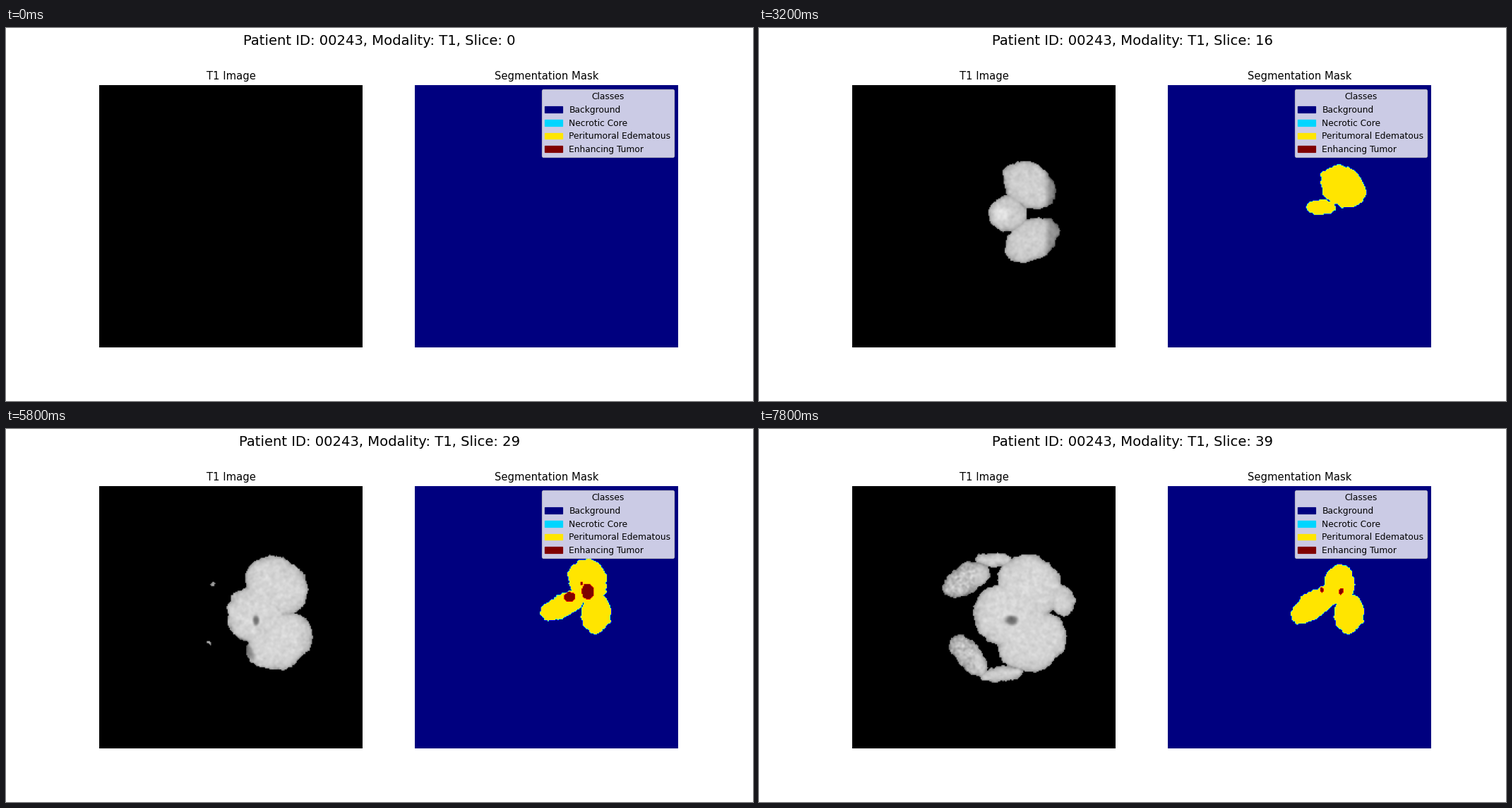
Recreate the animation shown at these times as a matplotlib script. Size 1058 by 529 pixels, loop 8 s.

```python
import numpy as np
import matplotlib.pyplot as plt
from matplotlib.animation import FuncAnimation
from matplotlib.patches import Patch

W, H = 1058, 529
SLICES, STEP_MS = 40, 200
N = 240                                  # voxels per image side
SIDE = W * 0.775 / 2.2                   # panel side in stage pixels
LEFT, TOP = W * 0.125, H * 0.505 - SIDE / 2

# voxel centres in stage pixels of the left panel
row, col = np.mgrid[:N, :N]
X = LEFT + (col + 0.5) * SIDE / N
Y = TOP + (row + 0.5) * SIDE / N


def lerp(a, b, t):
    return a + (b - a) * t


def ramp(n, start, end):
    return min(max((n - start) / (end - start), 0), 1)


def pulse(n, start, end):
    return np.sin(np.pi * ramp(n, start, end))


def settle(h, pace):
    """Shrinks evenly below zero, levels off at one above it."""
    return h / 8 if h < 0 else 1 - np.exp(-h / pace)


def axes_of(x, y, rx, ry, deg):
    c, s = np.cos(np.radians(deg)), np.sin(np.radians(deg))
    u, v = (X - x) * c + (Y - y) * s, (Y - y) * c - (X - x) * s
    return u / rx, v / ry


def blob(x, y, rx, ry, deg=0):
    """Approximate signed distance to an ellipse, positive inside."""
    if min(rx, ry) <= 0.5:
        return np.full(X.shape, -99.0)
    u, v = axes_of(x, y, rx, ry, deg)
    r = np.hypot(u, v)
    return r * (1 - r) / (np.hypot(u / rx, v / ry) + 1e-9)


def spot(x, y, rx, ry, deg=0):
    """Flat-topped soft ellipse."""
    u, v = axes_of(x, y, rx, ry, deg)
    return np.exp(-(u * u + v * v)**2)


def union(*fields):
    return np.max(fields, axis=0)


def blur(a, times):
    for _ in range(times):
        for axis in (0, 1):
            a = (np.roll(a, 1, axis) + 2 * a + np.roll(a, -1, axis)) / 4
    return a / a.std()


rng = np.random.default_rng(7)
ragged, wavy, swirl_a, swirl_b = (
    blur(rng.normal(size=X.shape), k) for k in (1, 14, 4, 4))
rough = 0.5 * ragged + 0.9 * wavy


def tissue_field(n):
    h = n - 10
    wide, thick = settle(h, 6), settle(h, 12)
    horn, arch = ramp(n, 28, 39), ramp(n, 33, 39)
    return union(
        # two lobes and the stem between them
        blob(383, 224, lerp(30, 48, wide), lerp(21, 46, thick), 36),
        blob(387, 301, lerp(28, 50, wide), lerp(18, 45, thick), -30),
        blob(351 + 0.2 * h, 264, 20 + 1.15 * h, min(18 + 1.3 * h, 48)),
        # side horns, their arches and the outer bulge
        blob(293, lerp(222, 214, horn), 36 * horn, 20 * horn, -28),
        blob(lerp(288, 297, horn), lerp(303, 322, horn),
             36 * horn, 18 * horn, 50),
        blob(332, 186, 27 * arch, 10 * arch),
        blob(345, 348, 32 * arch, 11 * arch, -8),
        blob(428, 243, 18 * arch, 24 * arch, -20))


def label_field(n):
    h = n - 10
    wide, thick = settle(h, 6), settle(h, 12)
    turn, lean, sink = ramp(n, 22, 33), ramp(n, 10, 33), ramp(n, 33, 39)
    tail = 1 + min(h, 0) / 12
    foot = ramp(n, 17, 29)
    return union(
        blob(lerp(380, 375, turn), lerp(226, 212, turn) + 10 * sink,
             lerp(27 + 13 * wide, 29, turn), lerp(17 + 25 * thick, 22, turn),
             lerp(36, 90, turn)),
        blob(lerp(353, 341, lean), lerp(257, 248, lean),
             lerp(14, 41, lean) * tail, lerp(8, 18, lean) * tail,
             lerp(20, -37, lean)),
        blob(389, 262, 22 * foot, 28 * foot))


def hot_field(n):
    p, q, r = pulse(n, 18, 42), pulse(n, 19, 31), pulse(n, 29, 37)
    return union(
        blob(377, 231, 9 * p, 11 * p),
        blob(351, 239 - 10 * ramp(n, 33, 39), 8 * p, 7 * p),
        blob(350, 227, 4 * p, 3 * p),
        blob(368, 220, 4 * q, 5 * q),
        blob(320, 267, 4 * r, 3 * r))


def shade(n, depth):
    """Brightness of the tissue: rounded edges, blots and grain."""
    grain = blur(np.random.default_rng(n).normal(size=X.shape), 1)
    swirl = swirl_a * np.cos(n / 4) + swirl_b * np.sin(n / 4)
    inner = np.maximum(depth, 0)
    tone = 0.84 - 0.06 * np.exp(-max(n - 10, 0) / 6)
    edge = 0.12 * np.exp(-inner / 8) + 0.26 * np.exp(-inner / 2)
    value = tone * (1 - edge) + 0.013 * grain + 0.013 * swirl

    # bright stem, dark outer rim of the low slices
    value += 0.12 * ramp(n, 30, 10) * spot(342, 266, 11, 12)
    value -= 0.2 * ramp(n, 20, 16) * np.clip((X - 404) / 8, 0, 1)
    # ventricle, shaded flank, duller horns
    wide = ramp(n, 23, 39)
    value -= 0.4 * ramp(n, 22, 26) * spot(lerp(352, 358, wide), 272,
                                          lerp(2, 9, wide), 7)
    value -= 0.25 * pulse(n, 18, 39) * spot(341, 312, 6, 18, -35)
    horns = ramp(n, 28, 32) * np.clip((314 - X) / 14, 0, 1)
    value += horns * (0.03 * grain - 0.08)
    return np.clip(value, 0.12, 1)


def scan(n):
    """Grey image and label map of one slice."""
    if n < 2:
        return np.zeros((N, N)), np.zeros((N, N))
    depth = tissue_field(n) + rough
    grey = np.where(depth > 0, shade(n, depth), 0)
    label = np.where(label_field(n) + rough > 0, 2, 0)
    label[(hot_field(n) + 0.4 * ragged > 0) & (label > 0)] = 3
    return grey, label


fig, (left, right) = plt.subplots(1, 2, figsize=(12, 6), dpi=W / 12)
blank = np.zeros((N, N))
photo = left.imshow(blank, cmap="gray", vmin=0, vmax=1)
mask = right.imshow(blank, cmap="jet", vmin=0, vmax=3)
left.set_title("T1 Image")
right.set_title("Segmentation Mask")
for ax in (left, right):
    ax.axis("off")

classes = ["Background", "Necrotic Core", "Peritumoral Edematous",
           "Enhancing Tumor"]
right.legend(handles=[Patch(color=plt.cm.jet(i / 3), label=name)
                      for i, name in enumerate(classes)],
             title="Classes", loc="upper right",
             labelspacing=0.455, borderpad=0.37)
heading = fig.suptitle("", fontsize=16, y=0.983)


def draw(n):
    grey, label = scan(n)
    photo.set_data(grey)
    mask.set_data(label)
    heading.set_text(f"Patient ID: 00243, Modality: T1, Slice: {n}")
    return photo, mask, heading


anim = FuncAnimation(fig, draw, frames=SLICES, interval=STEP_MS, repeat=True)
plt.show()
```
